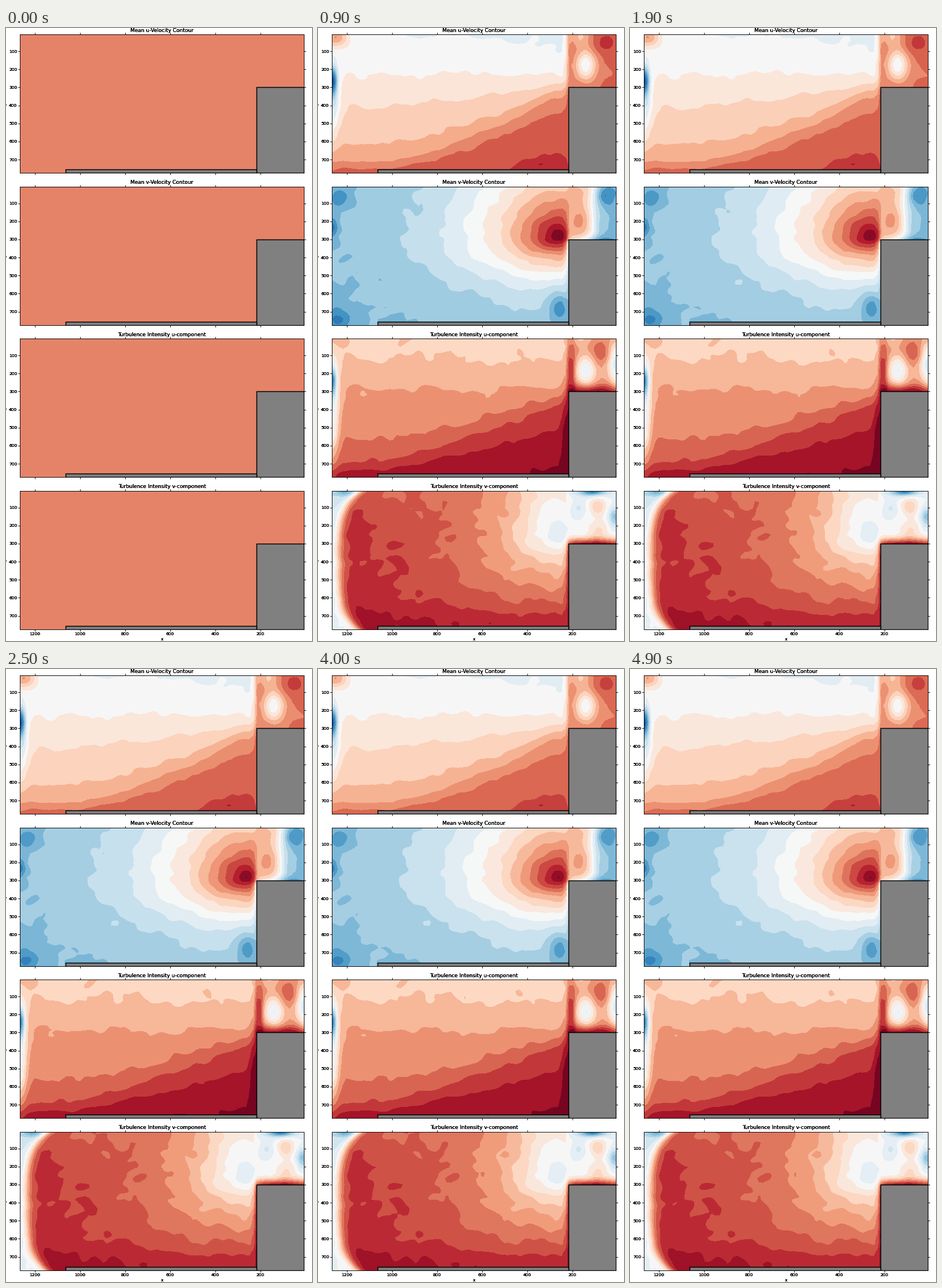
A matplotlib script for the animation above (5 s loop, 529 by 1058 pixels).

```python
import numpy as np
import matplotlib.pyplot as plt
from matplotlib.animation import FuncAnimation
from matplotlib.patches import Rectangle

W, H, DPI = 529, 1058, 52.9
FRAMES, INTERVAL = 50, 100
LEFT, WIDTH = 24.4, 490.6
TOP, HEIGHT, PITCH = 11.2, 238.9, 262.5
XLIM, YLIM = (1266, 7), (774, 7)
NX, NY = 80, 48
STEP_X, STEP_Y = 432, 91      # corner of the tall block, in panel pixels
CMAP = plt.get_cmap("RdBu_r")

px = np.linspace(LEFT, LEFT + WIDTH, NX)
py = np.linspace(0, HEIGHT, NY)
PX, PY = np.meshgrid(px, py)
GX, GY = np.linspace(*XLIM, NX), np.linspace(YLIM[1], YLIM[0], NY)


def bump(amp, x, y, w, h):
    return amp * np.exp(-((PX - x) / w) ** 2 / 2 - ((PY - y) / h) ** 2 / 2)


def rise(v, middle, width):
    return 1 / (1 + np.exp(-(v - middle) / width))


def layers(first, step, left, right, power):
    """Evenly spaced levels whose depths slide from the left to the right."""
    values = first + step * np.arange(-1, len(left) + 1)
    left, right = np.array([-90, *left, 300]), np.array([-90, *right, 300])
    s = np.clip((px - 110) / 300, 0, 1) ** power
    cols = [np.interp(py, left + (right - left) * t, values) for t in s]
    return np.array(cols).T


def radius(x, y, up, down):
    dy = PY - y
    return np.hypot(PX - x, dy * np.where(dy < 0, up, down))


def past_step(flow, lee, wall):
    """Join the main flow to the pocket above the block and its face."""
    mix = rise(PX, STEP_X - 1, 1.8)
    return flow * (1 - mix) + np.where(PY < STEP_Y + 1, lee, wall) * mix


def mean_u():
    flow = layers(0.4735, 0.0565, [-10, 70, 125, 190, 220, 232, 250],
                  [25, 72, 87, 97, 108, 135, 212], 1.5)
    flow += bump(-.43, 25, 80, 5, 18) + bump(-.17, 25, 125, 9, 42)
    flow += bump(.22, 30, 4, 15, 12) + bump(.05, 385, 225, 16, 6)
    lee = 0.76 + bump(-.29, 463, 53, 13, 19) + bump(.07, 497, 16, 16, 14)
    lee += bump(-.13, 455, 2, 12, 12)
    return past_step(flow, lee, 0.80)


def mean_v():
    flow = 0.28 + 0.70 * np.exp(-radius(416, 88, 1.0, 2.1) / 120)
    flow += bump(-.15, 418, 207, 14, 20) + bump(-.15, 25, 70, 6, 12)
    flow += bump(-.11, 38, 20, 12, 14) + bump(-.12, 35, 230, 15, 14)
    lee = 0.65 - 0.36 * rise(PX, 476, 7)
    lee += bump(-.11, 497, 18, 12, 12) + bump(.06, 452, 60, 12, 14)
    lee += bump(-.22, 470, 98, 30, 8)
    return past_step(flow, lee, 0.30)


def intensity_u():
    flow = layers(0.635, 0.0625, [35, 92, 175, 212, 228, 245],
                  [48, 85, 102, 117, 160, 225], 1.2)
    flow += bump(-.45, 25, 72, 5, 20) + bump(-.28, 25, 135, 8, 55)
    flow += bump(.06, 35, 5, 12, 8) + bump(.12, 431, 170, 6, 60)
    lee = 0.72 + bump(-.27, 463, 55, 12, 19) + bump(.10, 487, 22, 11, 13)
    lee += bump(-.34, 517, 45, 10, 25) + bump(.2, 437, 55, 5, 35)
    lee += bump(-.08, 455, 0, 12, 8) + bump(.26, 475, 94, 60, 9)
    return past_step(flow, lee, 0.97)


def intensity_v():
    flow = 0.875 - 0.45 * np.exp(-radius(412, 80, 0.45, 1.5) / 114)
    flow += 0.06 * rise(PY, 205, 10) + bump(-.05, 130, 0, 60, 30)
    edge = 36 + 36 * ((PY - 120) / 120) ** 4
    flow -= 0.45 * rise(edge, PX, 5) - bump(-.15, 50, 0, 18, 6)
    lee = 0.49 + bump(-.40, 475, 0, 18, 6) + bump(.14, 484, 28, 10, 11)
    lee += bump(-.20, 514, 45, 8, 13) + bump(-.07, 450, 30, 8, 12)
    lee += bump(.50, 475, 96, 60, 9) + bump(.10, 484, 68, 12, 10)
    return past_step(flow, lee, 0.94)


def smooth(a, passes):
    for _ in range(passes):
        p = np.pad(a, 1, mode="edge")
        a = (p[:-2, 1:-1] + 2 * p[1:-1, 1:-1] + p[2:, 1:-1]) / 4
        p = np.pad(a, 1, mode="edge")
        a = (p[1:-1, :-2] + 2 * p[1:-1, 1:-1] + p[1:-1, 2:]) / 4
    return a


def ripple(rng):
    fine, broad = (smooth(rng.normal(size=(NY, NX)), n) for n in (2, 10))
    return 0.75 * fine / fine.std() + 0.4 * broad / broad.std()


class Panel:
    def __init__(self, k, title, field, level, step, noise, stretch):
        self.title, self.stretch = title, stretch
        self.levels = level + step * np.arange(-int(level / step), 12)
        self.levels = self.levels[self.levels < 0.98]
        self.mids = np.append(self.levels - step / 2, self.levels[-1] + step / 2)
        self.fields = self.average(field(), noise, np.random.default_rng(11 + k))
        self.ax = self.make_axes(k)

    def average(self, base, noise, rng):
        """Mean over a growing number of samples, one field per frame."""
        base = base + noise * ripple(rng)
        total, fields = 0, [base]
        for k in range(1, FRAMES):
            total = total + ripple(rng)
            fields.append(base + noise * total / k)
        return fields

    def make_axes(self, k):
        bottom = 1 - (TOP + PITCH * k + HEIGHT) / H
        rect = [LEFT / W, bottom, WIDTH / W, HEIGHT / H]
        # Stacked passes make the lines and lettering heavier
        stack = [fig.add_axes(rect, facecolor=c) for c in ("#e58368", "none", "none")]
        for ax in stack:
            ax.set(xlim=XLIM, ylim=YLIM, xticks=range(200, 1201, 200),
                   yticks=range(100, 701, 100), ylabel="y")
            ax.tick_params(top=True, right=True, labelbottom=k == 3)
            ax.set_title(self.title, fontsize=12)
            if k == 3:
                ax.set_xlabel("x")
        for x, y, w, h in [(7, 300, 211, 474), (218, 755, 847, 19)]:
            stack[0].add_patch(Rectangle((x, y), w, h, fc="#808080", ec="black",
                                         lw=2, zorder=3))
        return stack[0]

    def contour(self, frame):
        # The colour range settles as the averages converge
        gain = 1 + self.stretch * np.exp(-frame / 12)
        tones = np.clip(0.5 + gain * (self.mids - 0.5), 0, 0.98)
        filled = self.ax.contourf(GX, GY, self.fields[frame], levels=self.levels,
                                  colors=CMAP(tones), extend="both", zorder=1)
        self.ax.set(xlim=XLIM, ylim=YLIM)
        return filled


plt.rcParams.update({"font.family": "DejaVu Sans", "font.size": 10})
fig = plt.figure(figsize=(W / DPI, H / DPI), dpi=DPI, facecolor="white")
panels = [
    Panel(0, "Mean u-Velocity Contour", mean_u, 0.53, 0.0565, 0.005, 0.17),
    Panel(1, "Mean v-Velocity Contour", mean_v, 0.525, 0.0550, 0.008, 0.15),
    Panel(2, "Turbulence Intensity u-component", intensity_u, 0.635, 0.0625, 0.007, 0),
    Panel(3, "Turbulence Intensity v-component", intensity_v, 0.845, 0.0525, 0.011, 0),
]
shown = []


def draw(frame):
    while shown:
        shown.pop().remove()
    if frame > 0:
        shown.extend(p.contour(frame) for p in panels)
    return []


anim = FuncAnimation(fig, draw, frames=FRAMES, interval=INTERVAL,
                     init_func=lambda: draw(0), repeat=True, repeat_delay=0)
plt.show()
```
